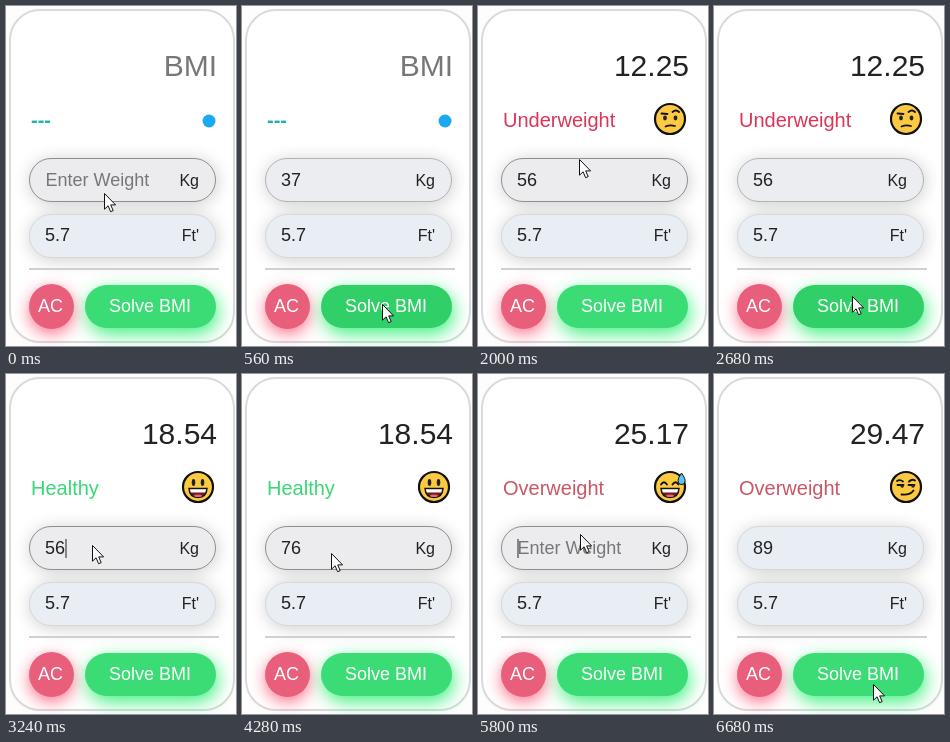
An HTML page for the animation above (6.72 s loop, 230 by 340 pixels).

```html
<!DOCTYPE html>
<html lang="en">
<head>
<meta charset="utf-8">
<title>BMI calculator</title>
<style>
  html, body { margin: 0; width: 100%; height: 100%; overflow: hidden; background: #fdfdfd; }
  #stage { position: relative; width: 230px; height: 340px; overflow: hidden; }
  #stage > * { position: absolute; box-sizing: border-box; }
  .card { left: 3px; top: 3px; width: 226px; height: 334px; border: 2px solid #dadada; border-radius: 31px; background: #fff; }
  .field { left: 22.5px; width: 187px; height: 44px; border: 1.5px solid #d6d8db; border-radius: 22px;
    background: #e9eef4; box-shadow: 1px 2px 17px rgba(0, 0, 0, .2); }
  #weight { top: 152px; }
  #height { top: 207.5px; }
  .rule { left: 23px; top: 262px; width: 190px; height: 2px; background: #d0d0d0; }
  .clear { left: 22.5px; top: 278px; width: 45px; height: 45px; border-radius: 50%; background: #e95f7b;
    box-shadow: 0 5px 16px rgba(255, 70, 105, .75); }
  #solve { left: 79px; top: 278.5px; width: 131px; height: 43px; border-radius: 22px; background: #3bdc76;
    box-shadow: 2px 6px 18px rgba(45, 240, 115, .9); }
  svg { left: 0; top: 0; font: 18px "Liberation Sans", Arial, sans-serif; fill: #222; }
  .big { font-size: 30px; }
  .unit { font-size: 16px; }
  .end { text-anchor: end; }
  .mid { text-anchor: middle; fill: #fff; }
  #status { font-size: 20px; }
  .face { visibility: hidden; }
  .ink { fill: none; stroke: #111; stroke-width: 1.8; stroke-linecap: round; stroke-linejoin: round; }
</style>
</head>
<body>
<div id="stage">
  <div class="card"></div>
  <div class="field" id="weight"></div>
  <div class="field" id="height"></div>
  <div class="rule"></div>
  <div class="clear"></div>
  <div id="solve"></div>
  <svg width="230" height="340" viewBox="0 0 230 340">
    <defs>
      <circle id="head" r="15" fill="#fcca42" stroke="#111" stroke-width="2.2"/>
      <g id="grin">
        <path d="M-9 1.5H9Q8.5 10.5 0 10.5T-9 1.5Z" fill="#6d1a1e" stroke="#111" stroke-width="1.4"/>
        <path d="M-8.2 2.2H8.2L7.2 5.4H-7.2Z" fill="#fff"/>
        <ellipse cy="8.8" rx="4" ry="1.3" fill="#e8636a"/>
      </g>
    </defs>
    <text id="result" class="big end" x="211" y="70"></text>
    <text id="status" x="25" y="121"></text>
    <text id="entry" x="39" y="180"></text>
    <text class="unit end" x="193" y="180">Kg</text>
    <text x="39" y="235">5.7</text>
    <text class="unit end" x="193" y="235">Ft'</text>
    <text class="mid" x="44.5" y="306">AC</text>
    <text class="mid" x="144" y="306">Solve BMI</text>

    <g transform="translate(192 113)">
      <circle class="face" cx="11" cy="2" r="6.5" fill="#1ca9f0"/>
      <g class="face">
        <use href="#head"/>
        <ellipse cx="-5" cy="-1" rx="1.9" ry="2.4"/>
        <ellipse cx="5.5" cy="-1" rx="1.9" ry="2.4"/>
        <path class="ink" d="M-8.5-5.5L-2.5-5M2.5-7Q6-10 9-7M-4.5 7.5Q0 5.5 5 7"/>
      </g>
      <g class="face">
        <use href="#head"/>
        <ellipse cx="-4.5" cy="-4.5" rx="1.8" ry="3.4"/>
        <ellipse cx="4.5" cy="-4.5" rx="1.8" ry="3.4"/>
        <use href="#grin"/>
      </g>
      <g class="face">
        <use href="#head"/>
        <path class="ink" d="M-9-2.5Q-6-7-3-2.5M2.5-2.5Q5.5-7 8.5-2.5"/>
        <use href="#grin"/>
        <path d="M11.5-14Q16-7.5 15-5.5A3.5 3.5 0 0 1 8-6.5Q8-9 11.5-14Z" fill="#5cc3f2" stroke="#111"/>
      </g>
      <g class="face">
        <use href="#head"/>
        <path class="ink" d="M-9-6Q-6-8-3-5.5M3-5.5Q6-8.5 9-6.5M-8.5-2H-2.5M2.5-2H8.5M-4.5 7.5Q4 8.5 7.5 3.5"/>
        <circle cx="-3.8" cy="-1" r="1.7"/>
        <circle cx="7" cy="-1" r="1.7"/>
      </g>
    </g>

    <rect id="caret" y="165" width="1" height="19"/>
    <path id="pointer" d="M.5.5V16.2L4.1 12.8L6.6 18.7L9.2 17.6L6.7 11.9H11.6Z"
      fill="#fff" stroke="#111" stroke-linejoin="round"/>
  </svg>
</div>
<script>
const LOOP = 6720, TICK = 40, HOLD = 120, REST = 200, FOCUS = 560, BLINK = 600;
const SQUARED_HEIGHT = 3.02;
const $ = id => document.getElementById(id);
const faces = document.querySelectorAll('.face');

// Each round: empty the field, type a weight, press the button.
const rounds = [
  { weight: '37', clear: 0, type: 80, press: 520, field: [98, 187], button: [140, 298] },
  { weight: '56', clear: 1680, type: 1680, press: 2640, field: [101, 153], button: [138, 290] },
  { weight: '76', clear: 3400, type: 3680, press: 4800, field: [86, 171], button: [128, 298] },
  { weight: '89', clear: 5600, type: 5880, press: 6400, field: [102, 160], button: [159, 310] }
];
const verdicts = [
  { below: 18.5, label: 'Underweight', color: '#dc3559' },
  { below: 25, label: 'Healthy', color: '#39d775' },
  { below: 28, label: 'Overweight', color: '#c95766' },
  { below: Infinity, label: 'Overweight', color: '#c95766' }
];

const ramp = (t, from, to) => Math.min(1, Math.max(0, (t - from) / (to - from)));
const smooth = p => p * p * (3 - 2 * p);
const lerp = (a, b, p) => a + (b - a) * p;
const mix = (a, b, p) => `rgb(${a.map((v, i) => Math.round(lerp(v, b[i], p)))})`;

function put(el, text, color) {
  el.textContent = text;
  el.style.fill = color;
}

function drawResult(t) {
  const solved = rounds.findLast(r => t >= r.press + HOLD);
  const bmi = solved && solved.weight / SQUARED_HEIGHT;
  const level = verdicts.findIndex(v => bmi < v.below);
  const { label, color } = verdicts[level] || { label: '---', color: '#1bb3b0' };
  put($('result'), solved ? bmi.toFixed(2) : 'BMI', solved ? '#222' : '#777');
  put($('status'), label, color);
  $('status').style.fontWeight = solved ? 400 : 700;
  faces.forEach((f, i) => f.style.visibility = i === level + 1 ? 'visible' : 'hidden');
}

function drawField(t, now, last, begin) {
  const digits = t < now.type ? 0 : t < now.type + TICK ? 1 : 2;
  const text = t < now.clear ? last.weight : now.weight.slice(0, digits);
  put($('entry'), text || 'Enter Weight', text ? '#222' : '#777');
  $('entry').setAttribute('x', text ? 39 : 39.5);

  const focusAt = begin + FOCUS;
  const focus = ramp(t, focusAt, focusAt + TICK) - ramp(t, now.press, now.press + 2 * TICK);
  const field = $('weight').style;
  field.borderColor = mix([214, 216, 219], [143, 143, 143], focus);
  field.background = mix([233, 238, 244], [236, 236, 238], focus);

  const lit = focus === 1 && t < now.press && Math.floor((t - focusAt) / BLINK) % 2 === 0;
  $('caret').setAttribute('x', 39 + text.length * 10 + .5);
  $('caret').style.visibility = lit ? 'visible' : 'hidden';
}

function drawPointer(t, now, last, begin) {
  const up = smooth(ramp(t, begin + REST, begin + FOCUS));
  const leave = Math.max(now.press - 600, now.type + 2 * TICK);
  const down = smooth(ramp(t, leave, now.press - 2 * TICK));
  const [x, y] = now.field.map((v, i) => Math.round(lerp(lerp(last.button[i], v, up), now.button[i], down)));
  $('pointer').setAttribute('transform', `translate(${x} ${y})`);
}

function draw(t) {
  const next = rounds.findIndex(r => t < r.press + REST);
  const i = next < 0 ? rounds.length - 1 : next;
  const now = rounds[i], last = rounds.at(i - 1);
  const begin = i ? last.press : -2 * BLINK;
  drawResult(t);
  drawField(t, now, last, begin);
  drawPointer(t, now, last, begin);
  const held = t >= now.press && t < now.press + HOLD;
  $('solve').style.background = held ? '#30cf68' : '#3bdc76';
}

const start = performance.now();
function loop() {
  const t = (performance.now() - start) % LOOP;
  draw(Math.floor(t / TICK) * TICK);
  requestAnimationFrame(loop);
}
loop();
</script>
</body>
</html>
```
